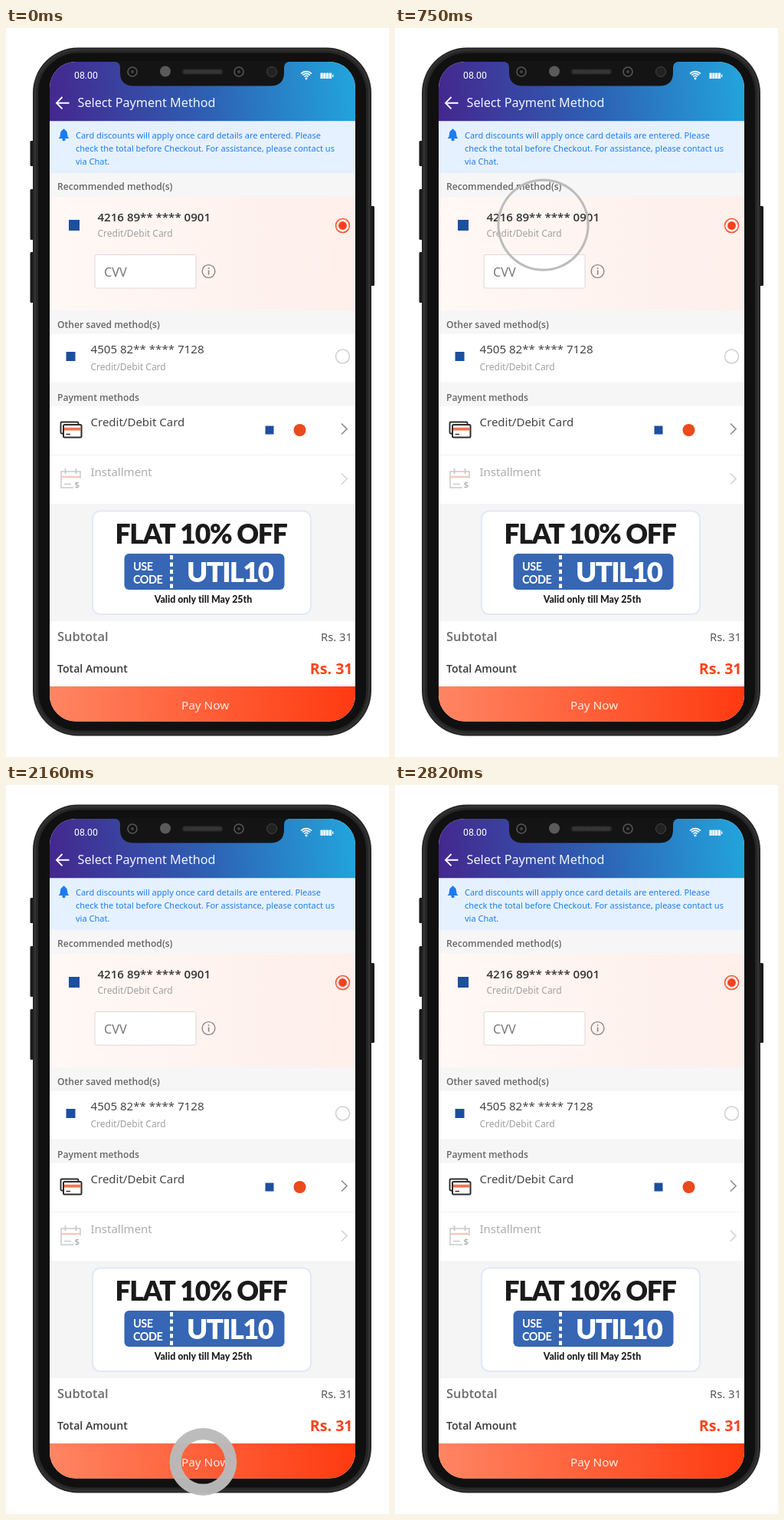
These frames come from a looping animation (500x950 px, 3.18 s). An HTML page with a canvas:

```html
<!DOCTYPE html>
<html lang="en">
<head>
<meta charset="utf-8">
<title>Select Payment Method</title>
<style>
html, body { margin: 0; width: 100%; height: 100%; overflow: hidden; background: #fff; }
canvas { display: block; width: 500px; height: 950px; }
</style>
</head>
<body>
<canvas id="stage"></canvas>
<script>
const W = 500, H = 950, LOOP = 3180, STEP = 30, TAP = 870;
const TAPS = [{ at: 150, x: 193.5, y: 256.7 }, { at: 1950, x: 257.4, y: 882 }];
const SANS = '"Noto Sans", "Open Sans", sans-serif';
const SEMI = '"Open Sans", "Noto Sans", sans-serif';
const LATO = 'Lato, "Open Sans", sans-serif';

const canvas = document.getElementById('stage');
const g = canvas.getContext('2d');
const ratio = window.devicePixelRatio || 1;
canvas.width = W * ratio;
canvas.height = H * ratio;

function box(x, y, w, h, fill, r = 0) {
  g.beginPath();
  g.roundRect(x, y, w, h, r);
  g.fillStyle = fill;
  g.fill();
}

function frame(x, y, w, h, color, width = 1, r = 0) {
  g.beginPath();
  g.roundRect(x, y, w, h, r);
  g.strokeStyle = color;
  g.lineWidth = width;
  g.stroke();
}

function disc(x, y, r, fill) {
  g.beginPath();
  g.arc(x, y, r, 0, Math.PI * 2);
  g.fillStyle = fill;
  g.fill();
}

function circle(x, y, r, color, width = 1) {
  g.beginPath();
  g.arc(x, y, r, 0, Math.PI * 2);
  g.strokeStyle = color;
  g.lineWidth = width;
  g.stroke();
}

function line(color, width, ...pts) {
  g.beginPath();
  for (let i = 0; i < pts.length; i += 2) g.lineTo(pts[i], pts[i + 1]);
  g.strokeStyle = color;
  g.lineWidth = width;
  g.stroke();
}

function text(str, x, y, size, color, family = SANS, weight = 400, align = 'left', gap = 0) {
  g.font = `${weight} ${size}px ${family}`;
  g.letterSpacing = gap + 'px';
  g.textAlign = align;
  g.fillStyle = color;
  g.fillText(str, x, y);
}

function fade(x0, y0, x1, y1, ...colors) {
  const grad = g.createLinearGradient(x0, y0, x1, y1);
  colors.forEach((c, i) => grad.addColorStop(i / (colors.length - 1), c));
  return grad;
}

function phone() {
  for (const [y, h] of [[147, 33], [210, 66], [292, 66]]) box(31.5, y, 6, h, '#1a1a1a', 1.5);
  box(475, 232, 6, 104, '#1a1a1a', 1.5);
  box(35, 25.5, 442, 897, '#262626', 59);
  frame(38, 28.5, 436, 891, '#343434', 2, 56);
  box(42, 32.5, 428, 883, '#101010', 52);
}

function header() {
  box(57, 44, 399, 77.5, fade(57, 105, 456, 60, '#44278f', '#2e5fb2', '#22a5dc'));
  line('#fff', 1.9, 73.5, 90, 66, 97.7, 73.5, 105.4);
  line('#fff', 1.9, 66, 97.7, 82.5, 97.7);
  text('08.00', 89, 66.2, 12.3, '#fff', 'Roboto, "Liberation Sans", sans-serif');
  text('Select Payment Method', 93.5, 103, 16.2, '#f2f5fc');

  for (const r of [3.6, 6.6, 9.4]) {
    g.beginPath();
    g.arc(392, 66, r, -Math.PI * 0.76, -Math.PI * 0.24);
    g.strokeStyle = '#fff';
    g.lineWidth = 1.7;
    g.stroke();
  }
  disc(392, 65.8, 1.5, '#fff');
  for (let i = 0; i < 4; i++) box(410.5 + i * 3.8, 58.5, 3.2, 7.5, '#fff', 0.6);
  box(426, 60.5, 1.3, 3.5, '#fff');
}

function notch() {
  g.beginPath();
  g.moveTo(143, 43);
  g.lineTo(143, 44);
  g.quadraticCurveTo(149, 45, 149, 52);
  g.lineTo(149, 58);
  g.quadraticCurveTo(149, 75.5, 167, 75.5);
  g.lineTo(345, 75.5);
  g.quadraticCurveTo(363, 75.5, 363, 58);
  g.lineTo(363, 52);
  g.quadraticCurveTo(363, 45, 369, 44);
  g.lineTo(369, 43);
  g.fillStyle = '#141414';
  g.fill();
  for (const x of [165, 304]) {
    circle(x, 57, 6, '#565656', 1.6);
    disc(x, 57, 2, '#444');
  }
  disc(208, 56.5, 7, '#5a5a5a');
  disc(347, 57, 7, '#222');
  circle(347, 57, 6.5, '#424242', 1);
  box(230, 53.5, 53, 7, '#2b2b2b', 3.5);
  g.setLineDash([1.2, 1.2]);
  line('#404040', 4, 233, 57, 280, 57);
  g.setLineDash([]);
}

function notice() {
  box(57, 121.5, 399, 68, '#e6f1ff');
  const blue = '#1b7cf2';
  g.beginPath();
  g.moveTo(68.5, 144);
  g.quadraticCurveTo(71, 142, 71, 138);
  g.bezierCurveTo(71, 131, 80, 131, 80, 138);
  g.quadraticCurveTo(80, 142, 82.5, 144);
  g.closePath();
  g.fillStyle = blue;
  g.fill();
  disc(75.5, 133, 1.4, blue);
  disc(75.5, 145.2, 2, blue);
  text('Card discounts will apply once card details are entered. Please', 91, 144, 11, blue);
  text('check the total before Checkout. For assistance, please contact us', 91, 161, 11, blue);
  text('via Chat.', 91, 178, 11, blue);
}

function section(label, y, h, base) {
  box(57, y, 399, h, '#f6f6f6');
  text(label, 67, base, 12.1, '#666', SEMI, 600);
}

// Plain squares and a disc stand where card marks go.
function mark(x, y, size) {
  box(x - size / 2, y - size / 2, size, size, '#1d4f9f');
}

function saved() {
  section('Recommended method(s)', 189, 31, 211.3);
  box(57, 220, 399, 148, fade(57, 0, 456, 0, '#fff8f5', '#feefea'));
  mark(89, 257, 14);
  text('4216 89** **** 0901', 119.5, 252.3, 15.1, '#333', SEMI, 600);
  text('Credit/Debit Card', 119.5, 271.5, 12, '#a0a0a0');
  circle(439.5, 257.5, 9, '#fa5030', 1.5);
  disc(439.5, 257.5, 5.4, '#fa401c');
  box(116, 295, 132, 44, '#fff', 2);
  frame(116, 295.5, 132, 43.5, '#dcd8d7', 1, 2);
  text('CVV', 128, 323.5, 16.2, '#777');
  circle(264.5, 317, 8.4, '#8a8583', 1.4);
  box(263.8, 315.6, 1.6, 6, '#8a8583');
  box(263.8, 312.2, 1.6, 1.8, '#8a8583');

  section('Other saved method(s)', 368, 30.5, 391.3);
  mark(84.5, 428, 12);
  text('4505 82** **** 7128', 110.5, 424.3, 15.1, '#444');
  text('Credit/Debit Card', 110.5, 445.5, 12, '#a0a0a0');
  circle(439.5, 428, 9, '#cfcfcf', 1.5);
}

function methods() {
  section('Payment methods', 461.5, 31, 485.5);
  frame(71.5, 513.5, 23, 15, '#2c2c2c', 1.9, 1.5);
  box(75, 517, 23.5, 17, '#fff', 1.5);
  frame(75, 517, 23.5, 16.5, '#2c2c2c', 2, 1.5);
  box(76, 520.8, 21.5, 3.6, '#f4724f');
  line('#333', 1.3, 78.5, 529.5, 84, 529.5);
  text('Credit/Debit Card', 110.5, 519.3, 15, '#444');
  mark(344, 524, 11);
  disc(383.5, 524, 8, '#ea4a1c');
  line('#8d8d8d', 1.7, 438, 515.5, 445, 522.5, 438, 529.5);

  box(57, 556, 399, 1, '#f2f2f2');
  const pale = '#cbc9c9';
  line(pale, 1.5, 88, 599, 72, 599, 72, 578, 97, 578, 97, 587);
  line('#f0cabd', 2.4, 72, 585, 97, 585);
  for (const x of [77.5, 91.5]) line(pale, 1.8, x, 574, x, 581);
  line(pale, 1.5, 76, 594.5, 85, 594.5);
  text('$', 89.5, 598.5, 11.5, '#b0adad', SEMI, 600);
  text('Installment', 110.5, 583.5, 15, '#adadad');
  line('#d2d2d2', 1.6, 438, 580.5, 445, 587.5, 438, 594.5);
}

function banner() {
  box(57, 620, 399, 153, '#f5f5f5');
  box(113, 629.5, 285, 134.5, '#fff', 10);
  frame(113, 629.5, 285, 134.5, '#e1e9f8', 2, 10);
  text('FLAT 10% OFF', 254.5, 672.3, 35.5, '#1b1b1b', LATO, 900, 'center', -1.3);
  box(154.5, 685, 209, 47, '#3666b4', 6);
  for (let i = 0; i < 5; i++) box(214, 687 + i * 9.4, 4, 5.4, '#fff');
  text('USE', 166, 706.7, 14.5, '#fff', LATO, 700, 'left', -0.5);
  text('CODE', 166, 724, 14.5, '#fff', LATO, 700, 'left', -0.5);
  text('UTIL10', 236, 721.7, 36.5, '#fff', LATO, 900, 'left', -1.7);
  g.fontVariantLigatures = 'none';
  text('Valid only till May 25th', 257.5, 749, 12.4, '#1b1b1b', LATO, 800, 'center', -0.02);
}

function totals() {
  text('Subtotal', 67, 798.5, 16.4, '#6c6c6c', SEMI, 600);
  text('Rs. 31', 452, 798.5, 14.8, '#555', SANS, 400, 'right');
  text('Total Amount', 67, 839.5, 14.1, '#3a3a3a', SEMI, 600);
  text('Rs. 31', 452.5, 842, 19.6, '#f9431d', SEMI, 700, 'right');
  box(57, 858, 399, 46, fade(57, 0, 456, 0, '#ff8562', '#ff3a10'));
  text('Pay Now', 229, 888, 15.3, '#ffeae4');
}

function screen() {
  g.save();
  g.beginPath();
  g.roundRect(57, 44, 399, 859.5, 34);
  g.clip();
  box(57, 44, 399, 860, '#fff');
  header();
  notice();
  saved();
  methods();
  banner();
  totals();
  g.restore();
  notch();
}

// A disc that grows fast and thins out into a ring.
function ripple(x, y, age) {
  if (age <= 0 || age >= TAP) return;
  const u = age / TAP;
  const outer = 62 * (1 - Math.exp(-5.1 * u));
  const inner = Math.max(0, outer - 24.5 * Math.pow(1 - u, 1.77));
  g.beginPath();
  g.arc(x, y, outer, 0, Math.PI * 2);
  g.arc(x, y, inner, 0, Math.PI * 2, true);
  g.fillStyle = 'rgba(186, 186, 186, 0.97)';
  g.fill();
}

function draw(now) {
  const t = Math.floor((now % LOOP) / STEP) * STEP;
  g.setTransform(ratio, 0, 0, ratio, 0, 0);
  box(0, 0, W, H, '#fff');
  phone();
  screen();
  for (const tap of TAPS) ripple(tap.x, tap.y, t - tap.at);
}

let start = null;
function tick(now) {
  if (start === null) start = now;
  draw(Math.max(0, now - start));
  requestAnimationFrame(tick);
}
draw(0);
requestAnimationFrame(tick);
</script>
</body>
</html>
```
